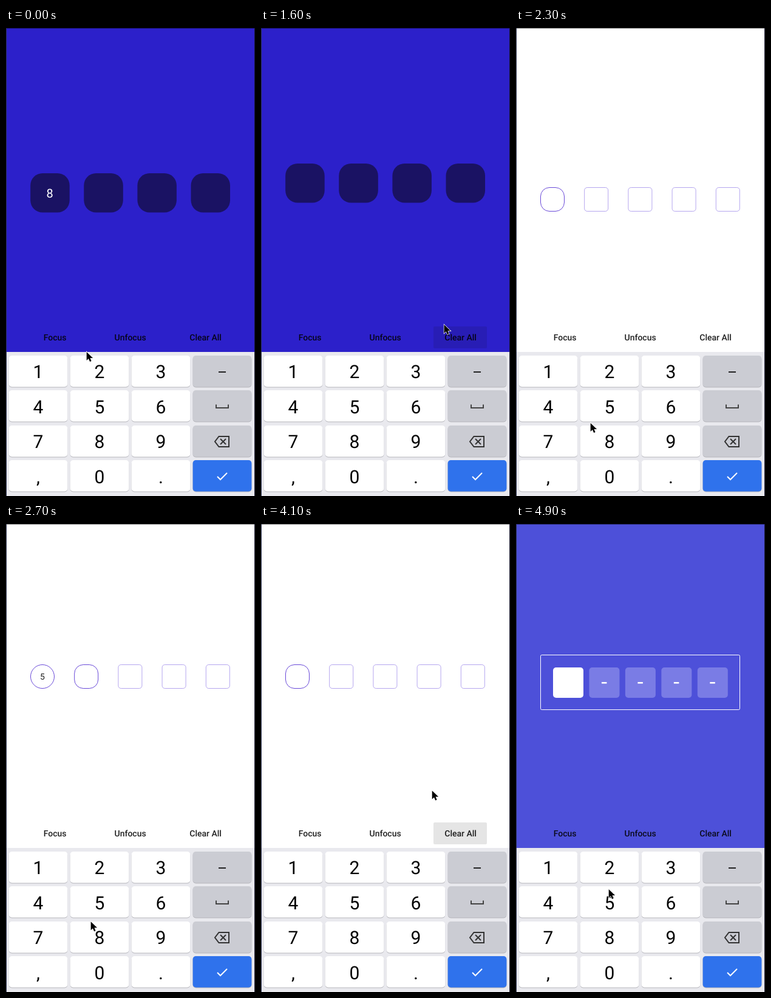
Recreate the animation shown at these times as an HTML page with a canvas. Size 410x770 px, loop 5000 ms.

```html
<!DOCTYPE html>
<html lang="en">
<head>
<meta charset="utf-8">
<title>PIN inputs</title>
<style>
html, body { margin: 0; width: 100%; height: 100%; overflow: hidden; }
canvas { display: block; }
</style>
</head>
<body>
<canvas width="410" height="770"></canvas>
<script>
const ctx = document.querySelector('canvas').getContext('2d');
const LOOP = 5000, STEP = 100, PAGE = 474;
const pageColors = [[44, 32, 202], [255, 255, 255], [77, 80, 217]];

// Pointer stops: time, x, y
const stops = [[0, 132, 532], [500, 90, 661], [900, 257, 590], [1200, 270, 661], [1500, 306, 500],
  [2100, 236, 326], [2300, 122, 649], [3000, 150, 656], [3200, 244, 429], [3600, 138, 270],
  [3800, 306, 500], [4600, 227, 303], [4900, 152, 600]];

const mix = (a, b, f) => a + (b - a) * f;
const progress = (t, start, duration) => Math.min(1, Math.max(0, (t - start) / duration));
const smooth = u => u * u * (3 - 2 * u);
// A quick flick that settles softly
const flick = (t, start, duration) => 1 - (1 - progress(t, start, duration) ** 2) ** 5.5;
const typed = (pin, t, start, interval, clear) =>
  t < clear && t >= start ? pin.slice(0, Math.floor((t - start) / interval) + 1) : '';

function box(x, y, w, h, r, fill, stroke) {
  ctx.beginPath();
  ctx.roundRect(x, y, w, h, r);
  if (fill) { ctx.fillStyle = fill; ctx.fill(); }
  if (stroke) { ctx.strokeStyle = stroke; ctx.lineWidth = 1; ctx.stroke(); }
}

function text(s, x, y, size, color, weight = 400) {
  ctx.font = `${weight} ${size}px Roboto, sans-serif`;
  ctx.textAlign = 'center';
  ctx.textRendering = 'geometricPrecision';
  ctx.fillStyle = color;
  ctx.fillText(s, x, y);
}

function line(d, color, width) {
  ctx.strokeStyle = color;
  ctx.lineWidth = width;
  ctx.stroke(new Path2D(d));
}

function darkPins(y, digits) {
  for (let i = 0; i < 4; i++) {
    const x = 40.2 + i * 88.1;
    box(x, y, 64.5, 64.5, 20, '#1a1263');
    if (digits[i]) text(digits[i], x + 32, y + 40, 20, '#fff');
  }
}

function outlinedPins(y, digits) {
  const n = digits.length;
  for (let i = 0; i < 5; i++) {
    const x = 40.5 + i * 72.2;
    const radius = i < n ? 19.5 : i === n ? 14.5 : 4.5;
    box(x, y + .5, 39, 39, radius, '#fff', i <= n ? '#6848d8' : '#b5a6ef');
    if (i < n) text(digits[i], x + 19.5, y + 25, 14, '#222');
  }
}

function framedPins(y) {
  box(40.5, y + .5, 328, 90, 2, null, '#fff');
  for (let i = 0; i < 5; i++) {
    const x = 61 + i * 59.45;
    box(x, y + 21, 50, 50, 5, i ? '#7a7ce5' : '#fff');
    if (i) box(x + 20.5, y + 45, 8.5, 2.6, 0, '#fff');
  }
}

function keyboard() {
  box(0, 533, 410, 237, 0, '#e9e9ee');
  ['123', '456', '789', ',0.'].forEach((row, r) => {
    const y = Math.floor(539 + r * 57.5);
    for (let c = 0; c < 4; c++) {
      const x = 4.6 + c * 101, fill = c < 3 ? '#fff' : r < 3 ? '#cbccd3' : '#2f72ec';
      box(x, y + 1, 96.8, 51.5, 5, '#b5b5bb');
      box(x, y, 96.8, 51.5, 5, fill);
      if (c < 3) text(row[c], x + 48.4, Math.floor(576.5 + r * 57.5), 30, '#000');
    }
  });
  box(350, 565, 12, 2, 0, '#222');
  line('M346 619.5V625h20v-5.5', '#444', 2);
  line('M350.5 672H367v17H350.5L344 680.5ZM353 676l9 9m0-9l-9 9', '#333', 2);
  line('M348 738l5 5 11-11', '#fff', 2);
}

function pointer(t) {
  const next = stops.findIndex(s => s[0] > t);
  const b = stops.at(next), a = next > 0 ? stops[next - 1] : b;
  const f = a === b ? 0 : smooth(progress(t, a[0], b[0] - a[0]));
  ctx.save();
  ctx.translate(mix(a[1], b[1], f) + .7, mix(a[2], b[2], f) + 1);
  ctx.scale(.88, .88);
  const arrow = new Path2D('M0 0V16L3.7 12.6 6.2 18.2 9 17 6.6 11.5H11.8Z');
  ctx.strokeStyle = '#fff';
  ctx.lineWidth = 1.6;
  ctx.stroke(arrow);
  ctx.fillStyle = '#000';
  ctx.fill(arrow);
  ctx.restore();
}

function background(t) {
  const white = progress(t, 2100, 200), violet = progress(t, 4500, 230);
  const [first, second, third] = pageColors;
  const rgb = first.map((v, i) => Math.round(mix(mix(v, second[i], white), third[i], violet)));
  box(0, 0, 410, 770, 0, `rgb(${rgb})`);
}

function pages(t) {
  const scroll = PAGE * (flick(t, -433, 640) - 1 + flick(t, 1900, 640) + flick(t, 4382, 420));
  ctx.save();
  ctx.beginPath();
  ctx.rect(0, 17, 410, PAGE - 1);
  ctx.clip();
  darkPins(Math.round(223 - scroll), typed('8789', t, 0, 400, 1500));
  outlinedPins(Math.round(231 + PAGE - scroll), typed('5836', t, 2600, 330, 4100));
  framedPins(Math.round(215 + 2 * PAGE - scroll));
  ctx.restore();
}

function buttons(t) {
  const pressed = [1400, 4000].some(start => t >= start && t < start + 300);
  if (pressed) box(284, 491, 88, 36, 2, 'rgba(0,0,0,.1)');
  ['Focus', 'Unfocus', 'Clear All'].forEach((label, i) =>
    text(label, 80.6 + i * 124, 514, 14, 'rgba(0,0,0,.87)', 500));
}

function draw(t) {
  background(t);
  pages(t);
  buttons(t);
  keyboard();
  box(0, 0, 410, 1, 0, 'rgba(0,0,0,.5)');
  box(0, 0, 1, 770, 0, '#252b4a');
  box(409, 0, 1, 770, 0, '#14142a');
  pointer(t);
}

const start = performance.now();
function tick() {
  const t = (performance.now() - start) % LOOP;
  draw(Math.floor(t / STEP) * STEP);
  requestAnimationFrame(tick);
}
tick();
</script>
</body>
</html>
```
